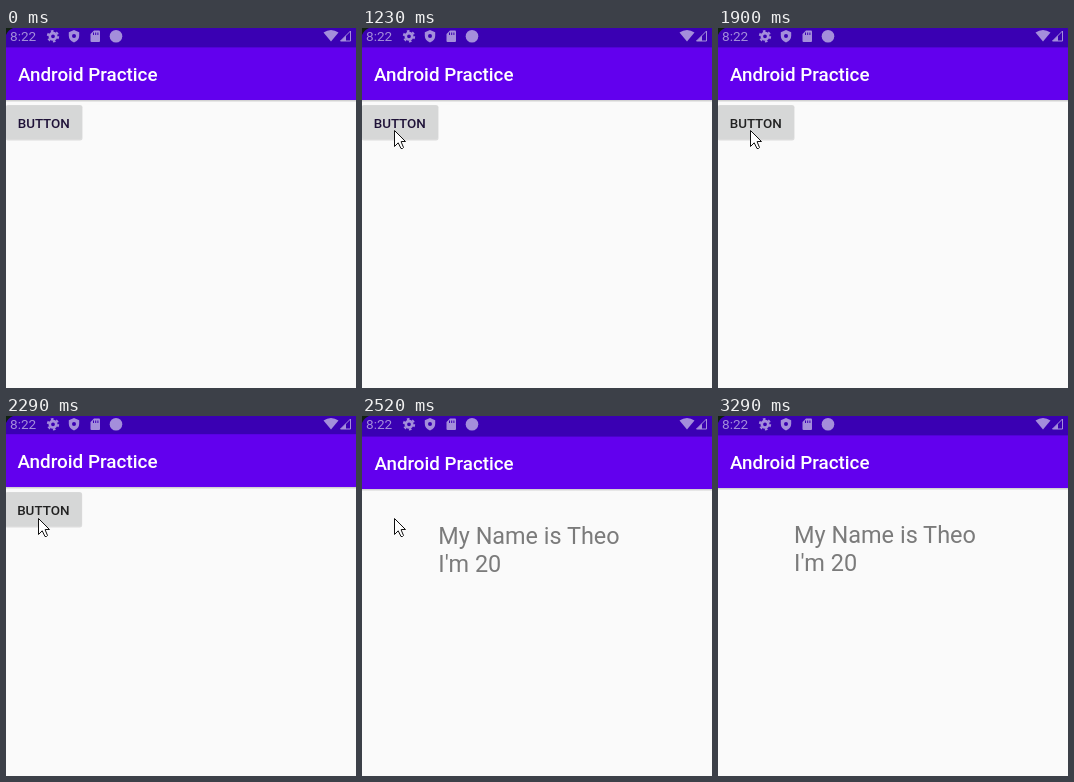
An HTML page for the animation above (4.06 s loop, 350 by 360 pixels).

```html
<!DOCTYPE html>
<html lang="en">
<head>
<meta charset="utf-8">
<title>Android Practice</title>
<style>
  html, body { margin: 0; width: 100%; height: 100%; overflow: hidden; background: #fafafa; }
  svg { display: block; width: 350px; height: 360px; font-family: Roboto, sans-serif; }
  .title { font: 500 18.8px Roboto, sans-serif; fill: #fff; }
  .label { font: 500 13.4px Roboto, sans-serif; }
  .info { font-size: 23.5px; fill: #7b7b7b; }
</style>
</head>
<body>
<svg viewBox="0 0 350 360">
  <defs>
    <linearGradient id="fade" x2="0" y2="1">
      <stop stop-opacity=".2"/>
      <stop offset="1" stop-opacity="0"/>
    </linearGradient>
    <clipPath id="face"><rect y="77.500" width="76" height="33.500" rx="2"/></clipPath>
    <g id="page">
      <rect x="-3" y="-3" width="356" height="746" fill="#fafafa"/>
      <rect x="-3" y="72" width="356" height="2.500" fill="url(#fade)"/>
      <rect x="-3" y="-3" width="356" height="75" fill="#6200ee"/>
      <rect x="-3" y="-3" width="356" height="22.400" fill="#3a00b3"/>
      <text class="title" x="12" y="53">Android Practice</text>
    </g>
  </defs>

  <g id="first">
    <use href="#page"/>
    <rect x="-.5" y="77" width="77" height="35.500" rx="2.500" opacity=".12"/>
    <rect y="77.500" width="76" height="33.500" rx="2" fill="#d6d7d7"/>
    <circle id="ripple" cx="32" cy="102" opacity=".14" clip-path="url(#face)"/>
    <text id="label" class="label" x="11.700" y="99.800">BUTTON</text>
  </g>

  <g id="second">
    <use href="#page"/>
    <text class="info" x="76" y="127">My Name is Theo</text>
    <text class="info" x="76" y="154.800">I'm 20</text>
  </g>

  <g fill="#a48edb">
    <text x="4" y="13" font-size="13.6">8:22</text>
    <g fill="none" stroke="#a48edb">
      <circle cx="47" cy="8.3" r="3.2" stroke-width="2.6"/>
      <circle cx="47" cy="8.3" r="5.2" stroke-width="2" stroke-dasharray="2.6 2.845"/>
    </g>
    <path d="M68 2l5.2 2.2v3.6q0 4.6-5.2 6.6q-5.2-2-5.2-6.6V4.2z"/>
    <circle cx="68" cy="8" r="2" fill="#3a00b3"/>
    <path d="M88 2.5h5a1 1 0 0 1 1 1v9.5a1 1 0 0 1-1 1h-7.5a1 1 0 0 1-1-1V6z"/>
    <path d="M87.5 4.5v2.5M89.7 4.5v2.5M91.9 4.5v2.5" stroke="#3a00b3"/>
    <circle cx="110" cy="8.3" r="6.3"/>
    <path d="M317.5 4.5q7.5-5 15 0L325 13.5z"/>
    <path d="M344.5 3v10h-10z" fill="none" stroke="#a48edb"/>
    <path d="M340 7.5v5.5h-5.5z"/>
  </g>
  <!-- Rounded corner of the device -->
  <path d="M0 0h7Q2 2 0 7z" fill="#102010"/>

  <path id="cursor" d="M.5.5v16l3.7-3.7 2.8 5.7h1.5l1-1-2.3-5.5v-.5h4.300z" fill="#fff" stroke="#111"/>
</svg>
<script>
const LOOP = 4060;
// The screen refreshes only at these moments
const TICKS = [0, 630, 690, 770, 850, 920, 1000, 1080, 1150, 1230, 1540, 1610, 1680, 1900,
  2290, 2370, 2450, 2520, 2600, 2680, 2990, 3060, 3140, 3220, 3290];
const OPEN = 2269, OPEN_TIME = 400;
const $ = id => document.getElementById(id);
const clamp = v => Math.min(1, Math.max(0, v));
const mix = (a, b, p) => a + (b - a) * p;
const show = (el, on) => el.style.display = on ? '' : 'none';

function bezier(a, b, c, d, u) {
  const v = 1 - u;
  return a * v * v * v + 3 * b * v * v * u + 3 * c * v * u * u + d * u * u * u;
}

// Quick start followed by a very long settling tail
function settle(x) {
  const [xs, ys] = x < 1 / 6
    ? [[0, .05, .1333, 1 / 6], [0, 0, .06, .4]]
    : [[1 / 6, .2083, .25, 1], [.4, .82, 1, 1]];
  let lo = 0, hi = 1;
  for (let i = 0; i < 20; i++) {
    const mid = (lo + hi) / 2;
    if (bezier(...xs, mid) < x) lo = mid; else hi = mid;
  }
  return bezier(...ys, lo);
}

function zoom(el, s) {
  el.setAttribute('transform', `translate(175 370) scale(${s}) translate(-175 -370)`);
}

function cursorAt(t) {
  if (t < 1230) {
    const p = (1 - Math.cos(Math.PI * clamp((t - 630) / 520))) / 2;
    return [mix(128, 32, p), mix(331, 108, p)];
  }
  const p = clamp((t - 2920) / 300) ** 1.5;
  return t < 2990 ? [32, 102] : [mix(32, 195, p), mix(102, 300, p)];
}

function draw(t) {
  const opening = clamp((t - OPEN) / OPEN_TIME);
  const p = settle(opening);
  zoom($('first'), mix(1, 1.15, p));
  zoom($('second'), mix(.85, 1, p));
  show($('first'), opening < 1);
  show($('second'), opening > 0);
  $('second').setAttribute('opacity', clamp((t - OPEN - 50) / 50));

  show($('ripple'), t >= 1540 && t < 1900);
  $('ripple').setAttribute('r', Math.max(0, 20 + (t - 1540) * .4));
  $('label').setAttribute('fill', t < 1540 ? '#1f1238' : '#222');

  show($('cursor'), t >= 630 && t < 3290);
  $('cursor').setAttribute('transform', `translate(${cursorAt(t).map(Math.round)})`);
}

const start = performance.now();
function frame() {
  const t = (performance.now() - start) % LOOP;
  draw(TICKS.findLast(tick => tick <= t) ?? 0);
  requestAnimationFrame(frame);
}
frame();
</script>
</body>
</html>
```
